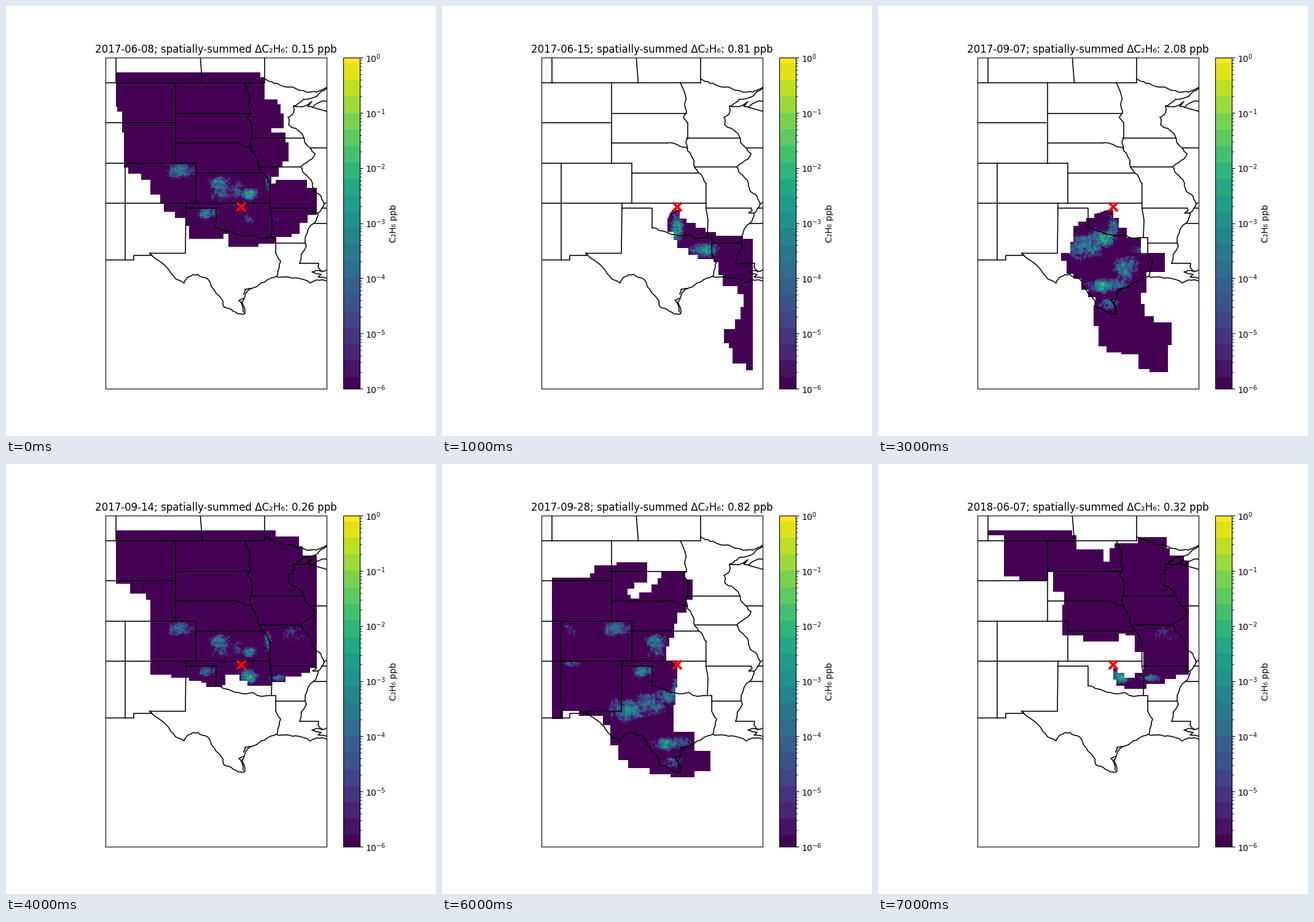
These frames come from a looping animation (700x700 px, 8 s). A matplotlib script:

```python
import numpy as np
import matplotlib.pyplot as plt
from matplotlib.animation import FuncAnimation
from matplotlib.colors import ListedColormap, LogNorm
from matplotlib.path import Path

ROWS, COLS = 300, 200                      # 0.1 degree cells
LEFT, RIGHT, TOP, BOTTOM = 178.5, 505.2, 108.5, 598.5

xs = LEFT + (np.arange(COLS) + 0.5) * (RIGHT - LEFT) / COLS
ys = TOP + (np.arange(ROWS) + 0.5) * (BOTTOM - TOP) / ROWS
X, Y = np.meshgrid(xs, ys)
CELLS = np.column_stack([X.ravel(), Y.ravel()])

rng = np.random.default_rng(7)


def noise(radius):
    """Unit-variance random field smoothed over a square window."""
    field = rng.standard_normal((ROWS, COLS))
    for axis in (0, 1):
        field = sum(np.roll(field, s, axis) for s in range(-radius, radius + 1))
    return field / field.std()


TEXTURE = 0.5 * noise(4) + 0.4 * noise(1) + 0.4 * noise(0)
# States without sources
EMPTY = (Y < 255.5) | ((X > 309) & (Y < 272) & (X < 416)) | ((X > 416) & (Y < 262))

# Source areas: centre and radii
AREAS = dict(
    rockies=(285, 268, 20, 11), west=(208, 271, 11, 11), mesa=(212, 325, 14, 6),
    kansas=(350, 290, 16, 11), prairie=(396, 306, 15, 9), plains=(372, 303, 46, 18),
    panhandle=(327, 338, 14, 8), river=(425, 288, 6, 16), ozark=(470, 278, 26, 14),
    tulsa=(398, 346, 13, 9), east=(446, 349, 14, 4), south=(381, 366, 9, 20),
    permian=(300, 400, 22, 14), basin=(336, 392, 30, 16), north=(362, 381, 20, 12),
    eagle=(372, 456, 25, 9), rio=(375, 486, 15, 9), coast=(404, 426, 17, 17),
    pines=(425, 397, 18, 10))

scenes = []


def scene(date, total, outline, **peaks):
    """Stepped outline (across, then down) and log10 peak of each active area."""
    x, y = np.reshape(outline, (-1, 2)).T
    steps = np.column_stack([np.repeat(x, 2)[1:], np.repeat(y, 2)[:-1]])
    inside = Path(steps).contains_points(CELLS).reshape(X.shape)
    level = np.full(X.shape, -9.0)
    for name, peak in peaks.items():
        cx, cy, rx, ry = AREAS[name]
        spread = ((X - cx) / rx) ** 2 + ((Y - cy) / ry) ** 2
        level = np.maximum(level, peak - 1.5 * spread)
    level = np.where(EMPTY, -6, level + TEXTURE)
    grid = np.ma.array(10 ** np.clip(level, -6, 0), mask=~inside)
    scenes.append((f"{date}; spatially-summed ΔC₂H₆: {total:.2f} ppb", grid))


scene("2017-06-08", 0.15,
      [178, 109, 413, 116, 421, 153, 442, 161, 446, 175, 451, 200, 431, 207,
       455, 223, 459, 254, 450, 263, 443, 278, 431, 289, 438, 283, 489, 296,
       506, 340, 490, 353, 477, 372, 464, 377, 439, 387, 410, 393, 361, 371,
       353, 379, 297, 358, 291, 345, 275, 336, 257, 322, 251, 307, 234, 283,
       219, 274, 198, 264, 192, 207, 188, 172, 180, 192],
      rockies=-3.9, kansas=-4.2, prairie=-3.6, panhandle=-3.9, river=-4.4,
      plains=-5.2, tulsa=-5.3, east=-5.5)

scene("2017-06-15", 0.81,
      [373, 333, 386, 347, 398, 354, 412, 361, 428, 368, 445, 375, 489, 380,
       506, 594, 494, 582, 473, 558, 466, 550, 458, 527, 476, 511, 486, 490,
       490, 470, 480, 457, 456, 438, 449, 418, 441, 413, 416, 406, 400, 394,
       382, 382, 376, 368, 366, 347],
      south=-3.3, pines=-3.2, north=-4)

scene("2017-08-31", 0.97,
      [372, 331, 387, 340, 412, 350, 440, 360, 477, 368, 506, 520, 491, 536,
       440, 528, 424, 508, 412, 470, 421, 445, 403, 426, 386, 405, 370, 385,
       366, 345],
      south=-3.3, pines=-3.1, coast=-3.8)

scene("2017-09-07", 2.08,
      [372, 333, 383, 346, 391, 361, 404, 378, 427, 402, 466, 433, 437, 468,
       426, 485, 434, 506, 448, 515, 477, 553, 471, 597, 441, 592, 424, 568,
       396, 564, 372, 554, 358, 522, 350, 487, 353, 474, 342, 463, 331, 445,
       318, 437, 306, 415, 298, 402, 312, 385, 317, 358, 325, 352, 338, 345,
       352, 339],
      north=-2.8, south=-4.3, basin=-3.7, eagle=-3.1, coast=-3.8, rio=-4.2,
      pines=-5)

scene("2017-09-14", 0.26,
      [178, 109, 438, 118, 475, 135, 482, 150, 506, 332, 494, 340, 480, 347,
       455, 355, 432, 361, 392, 354, 380, 344, 357, 360, 351, 364, 326, 357,
       318, 353, 298, 349, 268, 344, 234, 221, 228, 211, 201, 195, 178, 109],
      rockies=-4.3, kansas=-4.3, tulsa=-3.1, east=-3.5, river=-3.8,
      prairie=-4.5, panhandle=-4.5, ozark=-5.5, plains=-5.8)

scene("2017-09-21", 0.34,
      [379, 334, 387, 318, 412, 300, 430, 280, 446, 262, 458, 231, 470, 182,
       479, 152, 464, 138, 436, 109, 276, 128, 251, 168, 263, 206, 281, 231,
       302, 262, 326, 285, 356, 310],
      kansas=-4.1, prairie=-3.5, river=-4, plains=-5.2)

scene("2017-09-28", 0.82,
      [178, 185, 241, 178, 247, 166, 283, 160, 334, 194, 313, 203, 301, 213,
       306, 220, 321, 209, 340, 197, 350, 187, 357, 176, 396, 188, 407, 222,
       397, 243, 383, 260, 378, 283, 369, 298, 365, 321, 383, 365, 379, 392,
       376, 437, 410, 468, 437, 500, 410, 511, 372, 506, 337, 496, 303, 482,
       286, 458, 273, 425, 262, 410, 222, 402, 196, 416, 178, 185],
      west=-4.2, rockies=-4, kansas=-4.2, panhandle=-3.7, mesa=-4.6,
      permian=-3.1, basin=-4.1, north=-3.8, eagle=-3.6, rio=-4.8, south=-4.6,
      plains=-5.7)

scene("2018-06-07", 0.32,
      [178, 109, 316, 116, 322, 140, 366, 159, 376, 138, 385, 130, 422, 120,
       469, 138, 474, 149, 497, 157, 506, 343, 484, 350, 466, 358, 437, 366,
       400, 362, 388, 352, 383, 333, 390, 340, 400, 348, 417, 341, 431, 306,
       417, 280, 403, 276, 391, 290, 334, 280, 299, 229, 303, 208, 285, 176,
       276, 190, 229, 184, 205, 116, 178, 109],
      tulsa=-3.1, east=-3.1, ozark=-5.6)

fig, ax = plt.subplots(figsize=(7, 7), dpi=100)
bands = np.clip(np.round(np.linspace(0, 1, 540) * 20 - 0.17) / 20, 0, 1)
cmap = ListedColormap(plt.get_cmap("viridis")(bands))
image = ax.imshow(scenes[0][1], cmap=cmap, norm=LogNorm(1e-6, 1),
                  extent=(LEFT, RIGHT, BOTTOM, TOP), interpolation="nearest")
ax.set(xlim=(162.17, 521.5), ylim=(623, 84), aspect="equal", xticks=[], yticks=[])
fig.colorbar(image, ax=ax, label="C₂H₆ ppb")
title = ax.set_title(scenes[0][0])


def border(*xy, rough=0.0):
    """Polyline, its segments split at displaced midpoints when rough."""
    pts = np.reshape(xy, (-1, 2)).astype(float)
    for _ in range(2 if rough else 0):
        d = np.diff(pts, axis=0)
        shift = rough * rng.uniform(-1, 1, (len(d), 1)) * d[:, ::-1] * [-1, 1]
        mid = pts[:-1] + d / 2 + shift
        pts = np.insert(pts, np.arange(1, len(pts)), mid, axis=0)
    ax.plot(*pts.T, color="black", lw=1.15, solid_joinstyle="round")


def natural(*xy):
    border(*xy, rough=0.13)


# Straight borders
for y, x0, x1 in [(124.8, 160, 421), (190.2, 160, 275.7), (255.5, 160, 308.8),
                  (174.8, 275.7, 398), (222.8, 275.7, 366), (214.7, 398, 485),
                  (262.4, 411, 480), (271.8, 308.8, 418), (320.8, 160, 429.7),
                  (329, 429.7, 503), (386.2, 439.2, 487), (231, 495, 524),
                  (353.5, 501, 524), (329, 514, 524)]:
    border(x0, y, x1, y)
for x, y0, y1 in [(178.5, 80, 124.8), (421, 80, 124.8), (275.7, 124.8, 255.5),
                  (194, 255.5, 413.4), (308.8, 255.5, 320.8)]:
    border(x, y0, x, y1)
border(316, 80, 319.5, 124.8)
border(293, 320.8, 292, 402.5, 234, 402.5, 236, 406, 208, 406, 208, 413.4,
       160, 413.4)
border(293, 329, 341.8, 329, 341.8, 361)
border(503, 329, 505, 333, 499, 337, 508, 337)
border(429.7, 289, 429.7, 329, 433, 348, 432, 377, 439.2, 377, 439.2, 402.5)
border(478, 418.8, 509, 418.8, 508, 425, 514, 433)

# Northern lakes
natural(421, 118, 427, 122, 437, 126, 449, 130, 471, 134, 497, 140, 513, 137,
        523, 132)
natural(523, 134, 511, 141, 484, 152, 468, 163, 488, 162, 498, 156, 491, 163,
        499, 165, 523, 155)
border(499, 165, 510, 168, 524, 172)

# Rivers
natural(388, 125, 395, 160, 398, 174, 393, 181, 400, 190)
border(400, 190, 400, 215)
natural(400, 215, 397, 222, 407, 246, 411, 262, 418, 272, 424, 278, 430, 289)
natural(366, 223, 384, 226, 400, 232)
natural(468, 163, 468, 174, 459, 181, 460, 193, 482, 208, 486, 222, 495, 231,
        503, 240, 494, 251, 485, 257, 480, 262, 486, 273, 499, 289, 501, 300,
        513, 310, 518, 322, 508, 337, 502, 353, 487, 377, 489, 391, 478, 419)
border(518, 322, 524, 319)
natural(342, 361, 357, 366, 379, 372, 390, 374, 402, 372, 432, 377)
natural(439, 402, 447, 415, 444, 428, 441, 440)
natural(234, 402, 264, 428, 276, 444, 290, 451, 297, 441, 312, 437, 329, 445,
        336, 459, 348, 473, 355, 490, 370, 497, 386, 502, 389, 500)

# Gulf coast
natural(388, 501, 384, 482, 390, 468, 408, 457, 425, 446, 440, 440, 458, 441,
        475, 443, 495, 451, 505, 446, 524, 449)
natural(386, 498, 379, 479, 386, 476)
natural(387, 469, 389, 461, 400, 460)
natural(524, 430, 511, 431, 498, 433, 513, 437, 508, 441, 524, 443)

ax.plot(383, 327, "x", color="red", ms=10, mew=3, zorder=5)


def update(i):
    text, grid = scenes[i]
    image.set_data(grid)
    title.set_text(text)
    return image, title


anim = FuncAnimation(fig, update, frames=len(scenes), interval=1000, repeat=True)
plt.show()
```
